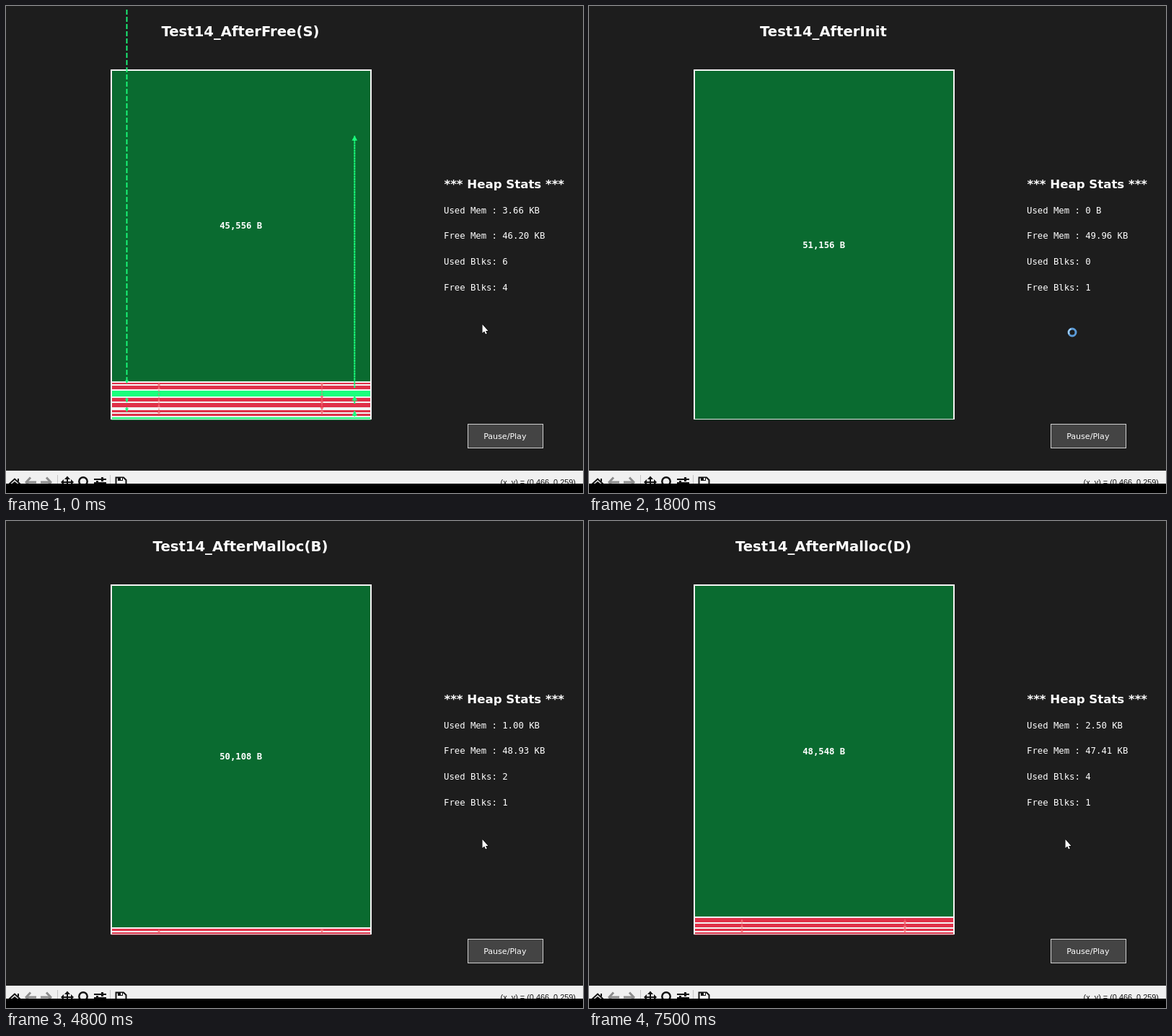
Animation, 800 px wide and 676 px high, one loop 8 s. Source, as an HTML page with a canvas:

```html
<!DOCTYPE html>
<html lang="en">
<head>
<meta charset="utf-8">
<title>Heap view</title>
<style>
html, body { margin: 0; width: 100%; height: 100%; overflow: hidden; background: #1d1d1d; }
canvas { display: block; }
</style>
</head>
<body>
<canvas id="stage" width="800" height="676"></canvas>
<script>
const ctx = document.getElementById('stage').getContext('2d');
const LOOP = 8000, HEADER = 12, TOTAL = 51168;
const BOX = { left: 146, right: 506, top: 89, bottom: 574 };
const SANS = '"DejaVu Sans", sans-serif', MONO = '"DejaVu Sans Mono", monospace';
const GREEN = '#0a6b30', BRIGHT = '#1aff7c', RED = '#e03149', PINK = '#f26f78', WHITE = '#f4f4f4';

// Blocks run from the bottom up; negative sizes are free. The rest is one free block.
const states = [
  { at: 0, name: 'AfterFree(S)', blocks: [-524, 524, 556, -224, 780, 780, -1036, 780, 396], links: true },
  { at: 600, name: 'AfterInit', blocks: [] },
  { at: 2200, name: 'AfterMalloc(A)', blocks: [524] },
  { at: 3800, name: 'AfterMalloc(B)', blocks: [524, 524] },
  { at: 5400, name: 'AfterMalloc(C)', blocks: [524, 524, 780] },
  { at: 6900, name: 'AfterMalloc(D)', blocks: [524, 524, 780, 780] }
];
const busy = [[200, 600], [1700, 2200], [2800, 3200], [3300, 3800], [4900, 5400], [7000, 7500]];

function rect(x, y, w, h, color) {
  ctx.fillStyle = color;
  ctx.fillRect(x, y, w, h);
}

function text(str, x, y, font, align = 'left', color = '#fff') {
  ctx.font = font;
  ctx.textAlign = align;
  ctx.fillStyle = color;
  ctx.fillText(str, x, y);
}

function line(points, color, width, dash = []) {
  ctx.beginPath();
  points.forEach(p => ctx.lineTo(...p));
  ctx.strokeStyle = color;
  ctx.lineWidth = width;
  ctx.setLineDash(dash);
  ctx.stroke();
  ctx.setLineDash([]);
}

function shape(points, color) {
  ctx.beginPath();
  points.forEach(p => ctx.lineTo(...p));
  ctx.closePath();
  ctx.fillStyle = color;
  ctx.fill();
}

function ring(x, y, r, color, width, from = 0, to = 7) {
  ctx.beginPath();
  ctx.arc(x, y, r, from, to);
  ctx.strokeStyle = color;
  ctx.lineWidth = width;
  ctx.stroke();
}

function arrow(x, from, to, color, width, dash, size) {
  const back = to + Math.sign(from - to) * size * 1.8;
  line([[x, from], [x, to]], color, width, dash);
  shape([[x, to], [x - size, back], [x + size, back]], color);
}

function size(bytes) {
  return bytes < 1024 ? bytes + ' B' : (bytes / 1024).toFixed(2) + ' KB';
}

function drawHeap({ blocks, links }) {
  const { left, right, top, bottom } = BOX;
  const scale = (bottom - top) / TOTAL;
  const all = [...blocks, blocks.reduce((rest, b) => rest - Math.abs(b), TOTAL) * -1];
  const used = [], edges = [];
  let y = bottom;
  all.forEach((b, i) => {
    const h = Math.abs(b) * scale;
    y -= h;
    const last = i === all.length - 1;
    rect(left, y, right - left, h + 0.5, b > 0 ? RED : last ? GREEN : BRIGHT);
    if (b > 0) used.push(y + h / 2);
    if (last) {
      const label = (-b - HEADER).toLocaleString('en-US') + ' B';
      text(label, 325.7, y + h / 2 + 4.5, 'bold 12.27px ' + MONO, 'center');
    } else edges.push(Math.round(y));
  });

  for (const e of edges) rect(145, e, 362, 2, WHITE);
  rect(145, 88, 362, 2, WHITE);
  rect(145, 88, 2, 486, WHITE);
  rect(505, 88, 2, 486, WHITE);
  rect(145, 573, 362, 1, '#dcdcdc');

  for (let i = 1; i < used.length; i++) {
    arrow(212, used[i - 1], used[i], PINK, 1, [3, 2], 2);
    arrow(438, used[i], used[i - 1], PINK, 1, [3, 1], 2.5);
  }
  if (links) {
    for (const [a, b] of [[5, 524], [544, 550], [557, 563]]) arrow(167.5, a, b, BRIGHT, 1.8, [7, 3], 2.5);
    for (const [a, b] of [[530, 180], [552, 541], [570, 562]]) arrow(483.3, a, b, BRIGHT, 2, [3, 0.6], 3.8);
  }
  return all;
}

function drawStats(all) {
  const sum = list => list.reduce((s, b) => s + Math.abs(b) - HEADER, 0);
  const used = all.filter(b => b > 0), free = all.filter(b => b < 0);
  text('*** Heap Stats ***', 607.5, 252.5, 'bold 16.6px ' + SANS);
  [
    'Used Mem : ' + size(sum(used)),
    'Free Mem : ' + size(sum(free)),
    'Used Blks: ' + used.length,
    'Free Blks: ' + free.length
  ].forEach((row, i) => text(row, 607, 287.5 + i * 35.8, '12.27px ' + MONO));
}

function drawToolbar() {
  const ink = '#111', gray = '#8c8c8c';
  rect(0, 645, 800, 18, '#f0f0f0');
  line([[4, 664], [12, 656.5], [20, 664]], ink, 2);
  shape([[7, 664], [12, 660], [17, 664]], ink);
  rect(16, 656, 2, 4, ink);
  for (const [x, d] of [[27, 1], [63, -1]]) {
    line([[x + 7 * d, 654.5], [x + d, 661], [x + 7 * d, 667.5]], gray, 3);
    line([[x + d, 661], [x + 15 * d, 661]], gray, 3);
  }
  rect(71, 651, 1, 12, '#c4c4c4');
  rect(144, 651, 1, 12, '#c4c4c4');
  rect(84, 655, 2, 8, ink);
  rect(78, 660, 15, 2, ink);
  shape([[85, 652.5], [81, 657], [89, 657]], ink);
  shape([[76, 661], [80, 657], [80, 665]], ink);
  shape([[94, 661], [90, 657], [90, 665]], ink);
  ring(107, 660, 5.7, ink, 2.5);
  rect(122, 656, 17, 2, ink);
  rect(122, 661, 17, 2, ink);
  rect(132, 654, 3, 6, ink);
  rect(125, 659, 3, 4, ink);
  line([[152.5, 664], [152.5, 654.5], [163, 654.5], [166.5, 658], [166.5, 664]], ink, 2);
  rect(155, 654, 7, 5, ink);
  rect(159, 655, 2, 3, '#f0f0f0');
  text('(x, y) = (0.466, 0.259)', 790, 664.5, '10.9px "Liberation Sans", Arial, sans-serif', 'right', '#111');
  rect(0, 663, 800, 13, '#000');
}

function drawPointer(waiting) {
  if (waiting) {
    ring(670, 453, 5, '#5b9bd8', 3);
    ring(670, 453, 5, '#a9d4f5', 2, 2.6, 4.4);
    return;
  }
  const tip = [[660.5, 442], [660.5, 454], [663.2, 451.6], [665, 455.5], [666.8, 454.6], [665, 451], [668.5, 451]];
  line([...tip, tip[0]], '#000', 1.2);
  shape(tip, '#fff');
}

function draw(t) {
  const state = states.findLast(s => s.at <= t);
  rect(0, 0, 800, 676, '#1d1d1d');
  text('Test14_' + state.name, 325, 42.3, 'bold 19.65px ' + SANS, 'center');
  drawStats(drawHeap(state));
  rect(640, 580, 105, 34, '#d0d0d0');
  rect(641, 581, 103, 32, '#444');
  text('Pause/Play', 691.8, 600.5, '11.05px ' + SANS, 'center');
  drawToolbar();
  drawPointer(busy.some(([from, to]) => t >= from && t < to));
}

const start = performance.now();
function tick() {
  draw((performance.now() - start) % LOOP);
  requestAnimationFrame(tick);
}
tick();
</script>
</body>
</html>
```
